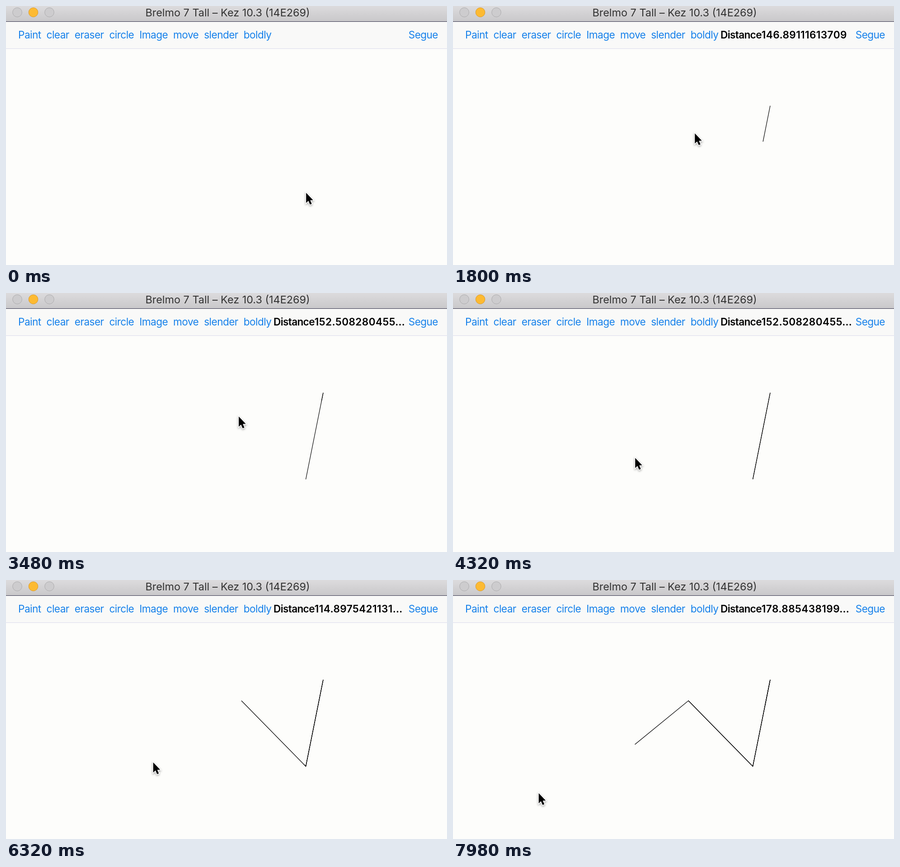
Write an HTML page with a canvas that moves like this. It is 976 px wide and 574 px high and loops after 8 s.

```html
<!DOCTYPE html>
<html lang="en">
<head>
<meta charset="utf-8">
<title>Line drawing</title>
<style>
html, body { margin: 0; width: 100%; height: 100%; overflow: hidden; background: #fdfdfb; }
#stage { position: fixed; inset: 0; overflow: hidden; font: 400 22.6px/30px Inter, sans-serif; letter-spacing: -0.55px; }
canvas { display: block; }
#title, #tools, #distance { position: absolute; white-space: pre; }
#title { top: 0; left: 0; width: 100%; box-sizing: border-box; padding-left: 5px; text-align: center; font-size: 23.4px; letter-spacing: 0; color: #323232; }
#tools { top: 49px; left: 27px; right: 20px; display: flex; gap: 12px; color: #1580ea; }
#tools :last-child { margin-left: auto; }
#distance { top: 49px; left: 592px; font-weight: 600; letter-spacing: -0.65px; color: #000; }
#digits { letter-spacing: 0.4px; }
</style>
</head>
<body>
<div id="stage">
  <canvas width="976" height="574"></canvas>
  <div id="title">Brelmo 7 Tall – Kez 10.3 (14E269)</div>
  <div id="tools"><span>Paint</span><span>clear</span><span>eraser</span><span>circle</span><span>Image</span><span>move</span><span>slender</span><span>boldly</span><span>Segue</span></div>
  <div id="distance" hidden>Distance<span id="digits"></span></div>
</div>
<script>
const LOOP = 8000;
const DRAW_TICKS = 41;
const ctx = document.querySelector('canvas').getContext('2d');
const distance = document.getElementById('distance');
const digits = document.getElementById('digits');
const arrow = new Path2D('M0 0V22.5L5 17.8L8.6 26L12.5 24.4L9 16.4L15.5 16.2Z');

// The path starts here; each click adds a corner, then the pointer travels on to the next one.
const origin = { x: 702, y: 221 };
const clicks = [
  { x: 663.5, y: 413, tick: 21, leave: 21, arrive: 42, text: '146.89111613709' },
  { x: 521, y: 267.5, tick: 72, leave: 72, arrive: 86, text: '152.508280455…' },
  { x: 402.5, y: 364.5, tick: 121, leave: 125, arrive: 152, text: '114.8975421131…' },
  { x: 189, y: 471.5, tick: 168, text: '178.885438199…' },
];
const corners = [origin, ...clicks];

const clamp = v => Math.max(0, Math.min(1, v));
const ease = v => v * v * (3 - 2 * v);
const mix = (a, b, k) => ({ x: a.x + (b.x - a.x) * k, y: a.y + (b.y - a.y) * k });

// Steps are held 20, 100 and 20 ms in turn.
function tickAt(ms) {
  const rest = ms % 140;
  return 3 * Math.floor(ms / 140) + (rest < 20 ? 0 : rest < 120 ? 1 : 2);
}

function pointerAt(tick) {
  let spot = clicks[0];
  clicks.slice(1).forEach((next, i) => {
    const { leave, arrive } = clicks[i];
    spot = mix(spot, next, ease(clamp((tick - leave) / (arrive - leave))));
  });
  return spot;
}

function strokePart(path, part) {
  const lengths = path.slice(1).map((p, i) => Math.hypot(p.x - path[i].x, p.y - path[i].y));
  let left = part * lengths.reduce((a, b) => a + b, 0);
  ctx.beginPath();
  ctx.moveTo(path[0].x, path[0].y);
  lengths.forEach((length, i) => {
    if (left <= 0) return;
    const end = mix(path[i], path[i + 1], Math.min(1, left / length));
    ctx.lineTo(end.x, end.y);
    left -= length;
  });
  ctx.stroke();
}

function drawLight(x, fill, edge) {
  ctx.beginPath();
  ctx.arc(x, 14, 10.3, 0, 2 * Math.PI);
  ctx.fillStyle = fill;
  ctx.fill();
  ctx.strokeStyle = edge;
  ctx.lineWidth = 1;
  ctx.stroke();
}

function drawBand(y, height, fill) {
  ctx.fillStyle = fill;
  ctx.fillRect(0, y, 976, height);
}

function drawWindow() {
  const bar = ctx.createLinearGradient(0, 0, 0, 34);
  bar.addColorStop(0, '#dcdbdd');
  bar.addColorStop(1, '#c9c8ca');
  drawBand(0, 574, '#fdfdfb');
  drawBand(0, 34, bar);
  drawBand(34, 1, '#30304a');
  drawBand(35, 59, '#f9f9f8');
  drawBand(94, 1, '#dadaec');
  drawLight(25, '#cdccce', '#adacae');
  drawLight(60.5, '#fdba32', '#d99b2e');
  drawLight(96, '#cdccce', '#adacae');
}

function drawPointer({ x, y }) {
  ctx.save();
  ctx.translate(x + 0.7, y + 1);
  ctx.shadowColor = 'rgba(0,0,0,.35)';
  ctx.shadowBlur = 4;
  ctx.shadowOffsetY = 2;
  ctx.strokeStyle = '#fff';
  ctx.lineWidth = 3;
  ctx.stroke(arrow);
  ctx.shadowColor = 'transparent';
  ctx.fillStyle = '#000';
  ctx.fill(arrow);
  ctx.restore();
}

function render(ms) {
  const tick = tickAt(ms % LOOP);
  const done = clicks.filter(click => tick >= click.tick);
  drawWindow();
  ctx.strokeStyle = '#000';
  ctx.lineWidth = 1.2;
  // Every click redraws the whole path so far on a new layer.
  done.forEach((click, i) => strokePart(corners.slice(0, i + 2), clamp((tick - click.tick) / DRAW_TICKS)));
  distance.hidden = !done.length;
  digits.textContent = done.length ? done[done.length - 1].text : '';
  drawPointer(pointerAt(tick));
}

let start;
function loop(now) {
  start ??= now;
  render(now - start);
  requestAnimationFrame(loop);
}
render(0);
requestAnimationFrame(loop);
</script>
</body>
</html>
```
